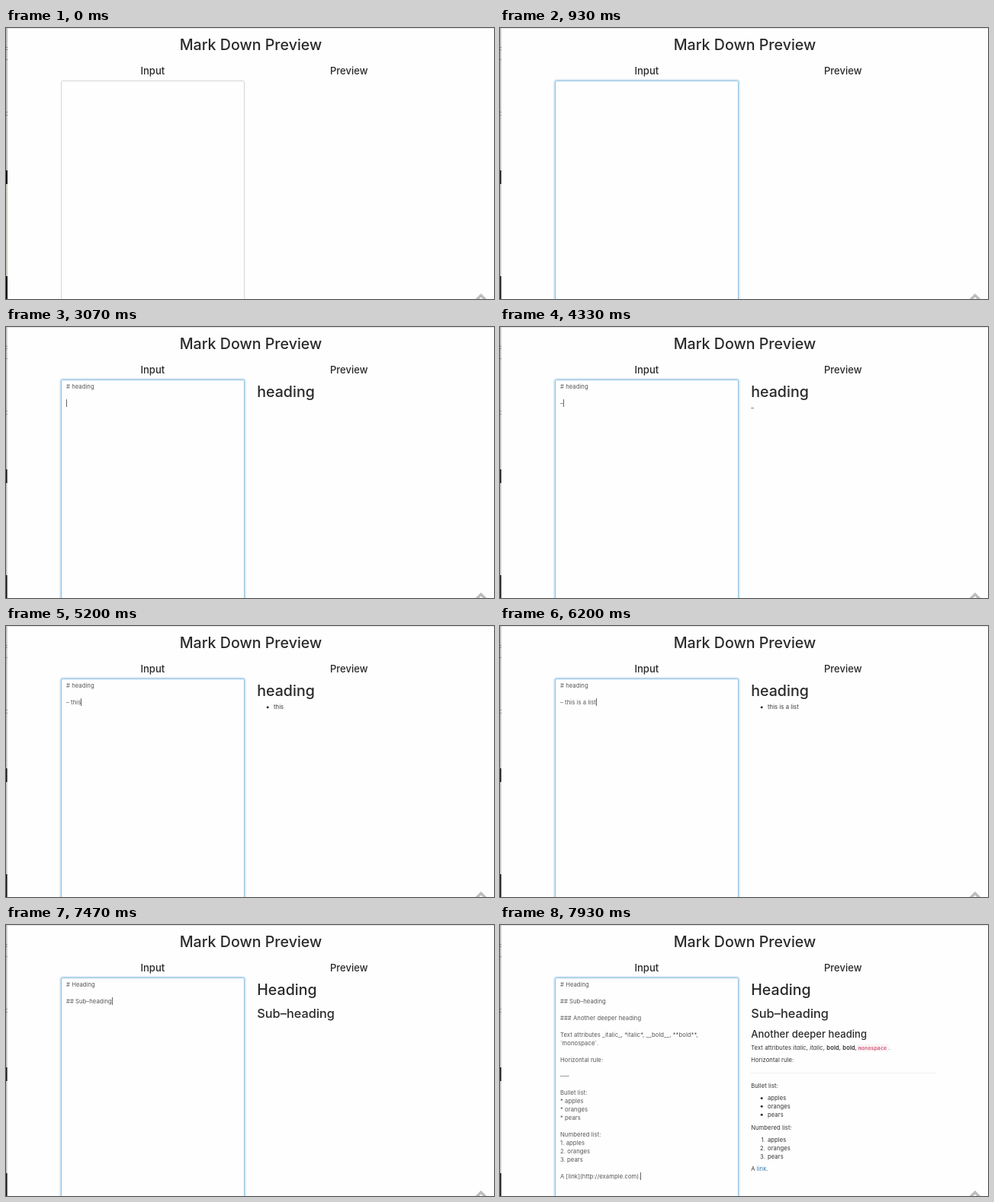
An HTML page for the animation above (8000 ms loop, 640 by 356 pixels).

```html
<!DOCTYPE html>
<html lang="en">
<head>
<meta charset="utf-8">
<title>Mark Down Preview</title>
<style>
  html, body { margin: 0; width: 100%; height: 100%; overflow: hidden; background: #fefefe; }
  svg { display: block; width: 100vw; height: 100vh; }
  text { font: 7.63px Inter, Roboto, sans-serif; font-optical-sizing: none; letter-spacing: .08px; white-space: pre; fill: #333; }
  .h1, .h2, .h3 { font-weight: 500; letter-spacing: 0; fill: #2b2b2b; }
  .h1 { font-size: 19.63px; }
  .h2 { font-size: 16.36px; }
  .h3 { font-size: 13.09px; }
  .mid { text-anchor: middle; }
  .num { text-anchor: end; }
  .raw { fill: #555; }
  .i { font-style: italic; }
  .b { font-weight: 600; }
  .link { fill: #337ab7; }
  .code { font: 6.87px "DejaVu Sans Mono", monospace; letter-spacing: 0; fill: #c7254e; }
</style>
</head>
<body>
<svg viewBox="0 0 640 356" preserveAspectRatio="none">
  <rect width="640" height="356" fill="#fefefe"/>
  <rect width="640" height="1" fill="#e3e3e3"/>
  <g id="edge">
    <rect width="2" height="187" fill="#bcbcbe"/>
    <rect y="187" width="2" height="18" fill="#151515"/>
    <rect id="edgeLow" y="205" width="2" height="121"/>
    <rect y="326" width="2" height="30" fill="#151515"/>
    <path d="M0 25.5h2M0 28.5h2M0 41.5h2M0 110.5h2M0 114.5h2" stroke="#777"/>
  </g>
  <text class="h1 mid" x="321" y="29">Mark Down Preview</text>
  <text class="h3 mid" x="192.3" y="61">Input</text>
  <text class="h3 mid" x="449.8" y="61">Preview</text>
  <g fill="none">
    <g id="glow" stroke="#66afe9">
      <rect x="71.5" y="68.5" width="242" height="310" rx="3" stroke-width="2.4" stroke-opacity=".3"/>
    </g>
    <rect id="box" x="72.5" y="69.5" width="240" height="308" rx="2"/>
  </g>
  <g id="input"></g>
  <rect id="caret" width="1" height="10" fill="#666"/>
  <g id="typed"></g>
  <g id="sample"></g>
  <path d="M614.5 359.5L623 351.2L631.5 359.5" fill="none" stroke="#bdbdbd" stroke-width="3.4"/>
</svg>
<script>
const LOOP = 8000, LINE = 10.957, LEFT = 79, PANE = 329.2, ITEM = 351;
const $ = id => document.getElementById(id);

function add(parent, tag, attrs, content = '') {
  const el = document.createElementNS('http://www.w3.org/2000/svg', tag);
  for (const key in attrs) el.setAttribute(key, attrs[key]);
  el.textContent = content;
  parent.appendChild(el);
  return el;
}
const label = (parent, x, y, content, cls = '') => add(parent, 'text', { x, y, class: cls }, content);
const bullet = (parent, y) => add(parent, 'circle', { cx: 343.2, cy: y - 2.6, r: 1.5, fill: '#333' });

const doc = [
  '# Heading', '', '## Sub–heading', '', '### Another deeper heading', '',
  'Text attributes _italic_, *italic*, __bold__, **bold**,', '`monospace`.', '',
  'Horizontal rule:', '', '–––', '',
  'Bullet list:', '* apples', '* oranges', '* pears', '',
  'Numbered list:', '1. apples', '2. oranges', '3. pears', '',
  'A [link](http://example.com).'
];

// Typed states: start time and text
const head = '# heading \n\n';
const states = [
  [0, ''], [1330, '#'], [1470, '# '], [1600, '# h'],
  [1800, '# he'], [1870, '# hea'], [2000, '# head'], [2070, '# headi'], [2130, '# headin'],
  [2270, '# heading'], [2470, '# heading '], [2800, '# heading \n'], [3070, head],
  [4330, head + '–'], [4530, head + '– '], [4930, head + '– t'], [5070, head + '– th'],
  [5130, head + '– thi'], [5200, head + '– this'], [5330, head + '– this '],
  [5470, head + '– this i'], [5530, head + '– this is'], [5670, head + '– this is '],
  [5800, head + '– this is a'], [5930, head + '– this is a '],
  [6070, head + '– this is a li'], [6200, head + '– this is a list'],
  [6800, head + '– this is a '], [6870, head + '– this is '], [6930, head + '– '],
  [7000, '# '], [7070, '']
];
// The sample document returns three lines at a time
[7470, 7530, 7600, 7670, 7730, 7800, 7870, 7930].forEach((t, k) =>
  states.push([t, doc.slice(0, 3 * (k + 1)).join('\n')]));
const SAMPLE_START = 7470;

const rows = doc.map((_, k) => label($('input'), LEFT, 80.9 + k * LINE, '', 'raw'));

const typed = $('typed');
const heading = label(typed, PANE, 92, '', 'h1');
const para = label(typed, PANE, 0, '');
const item = label(typed, ITEM, 109.4, '');
const dot = bullet(typed, 109.4);

// Rendered sample, each part tied to the input line that makes it
const parts = [];
function part(line, build) {
  const g = add($('sample'), 'g', {});
  build(g);
  parts.push({ line, g });
}
const textPart = (line, y, content, cls) => part(line, g => label(g, PANE, y, content, cls));

textPart(1, 92, 'Heading', 'h1');
textPart(3, 122, 'Sub–heading', 'h2');
textPart(5, 147.5, 'Another deeper heading', 'h3');
part(7, g => {
  const row = label(g, PANE, 163.9, '');
  [['Text attributes '], ['italic', 'i'], [', '], ['italic', 'i'], [', '],
   ['bold', 'b'], [', '], ['bold', 'b'], [', ']]
    .forEach(([s, cls = '']) => add(row, 'tspan', { class: cls }, s));
});
part(8, g => {
  add(g, 'rect', { x: 467.8, y: 156.4, width: 41.8, height: 9.6, rx: 2, fill: '#f9f2f4' });
  label(g, 470, 163.7, 'monospace', 'code');
  label(g, 509.6, 163.9, '.');
});
textPart(10, 180.2, 'Horizontal rule:');
part(12, g => add(g, 'rect', { x: 329, y: 194, width: 242, height: 1, fill: '#eee' }));
textPart(14, 213.8, 'Bullet list:');
['apples', 'oranges', 'pears'].forEach((name, k) => {
  const y = 230 + k * LINE, y2 = 284.9 + k * LINE;
  part(15 + k, g => { bullet(g, y); label(g, ITEM, y, name); });
  part(20 + k, g => { label(g, 348, y2, k + 1 + '.', 'num'); label(g, ITEM, y2, name); });
});
textPart(19, 268.5, 'Numbered list:');
part(24, g => {
  const row = label(g, PANE, 323.2, '');
  add(row, 'tspan', {}, 'A ');
  add(row, 'tspan', { class: 'link' }, 'link');
  add(row, 'tspan', {}, '.');
});

const show = (el, on) => el.setAttribute('visibility', on ? 'inherit' : 'hidden');
const between = (t, a, b) => t >= a && t < b;

function setText(el, s) {
  if (el.textContent !== s) el.textContent = s;
}

function drawTyped(lines) {
  const [first, , third = ''] = lines;
  const list = third.length > 2;
  setText(heading, first.startsWith('# ') ? first.slice(2).trimEnd() : '');
  setText(para, first === '#' ? '#' : list ? '' : third.trim());
  para.setAttribute('y', first === '#' ? 80.9 : 109.4);
  setText(item, list ? third.slice(2).trimEnd() : '');
  show(dot, list);
}

function draw(t) {
  let text = '';
  for (const [start, s] of states) if (t >= start) text = s;
  const lines = text.split('\n');
  const sample = t >= SAMPLE_START;

  rows.forEach((row, k) => setText(row, lines[k] || ''));
  const last = lines.length - 1;
  $('caret').setAttribute('x', Math.round(LEFT - .3 + (lines[last] ? rows[last].getComputedTextLength() : 0)));
  $('caret').setAttribute('y', Math.round(73.3 + last * LINE));
  show($('caret'), t >= 530 && !between(t, 930, 1200) && !between(t, 3530, 4070));

  const focus = t < 670 ? 0 : t < 730 ? .5 : 1;
  $('glow').setAttribute('opacity', focus);
  $('box').setAttribute('stroke', ['#d4d4d6', '#b4cad8', '#92c1dc'][focus * 2]);
  $('edge').setAttribute('transform', t < 530 ? 'scale(1)' : 'scale(.8 1)');
  $('edgeLow').setAttribute('fill', t < 330 ? '#c9c9bd' : '#c3c3c0');

  show(typed, !sample);
  show($('sample'), sample);
  if (!sample) drawTyped(lines);
  parts.forEach(p => show(p.g, sample && p.line <= lines.length));
}

const began = performance.now();
function tick() {
  draw((performance.now() - began) % LOOP);
  requestAnimationFrame(tick);
}
tick();
</script>
</body>
</html>
```
